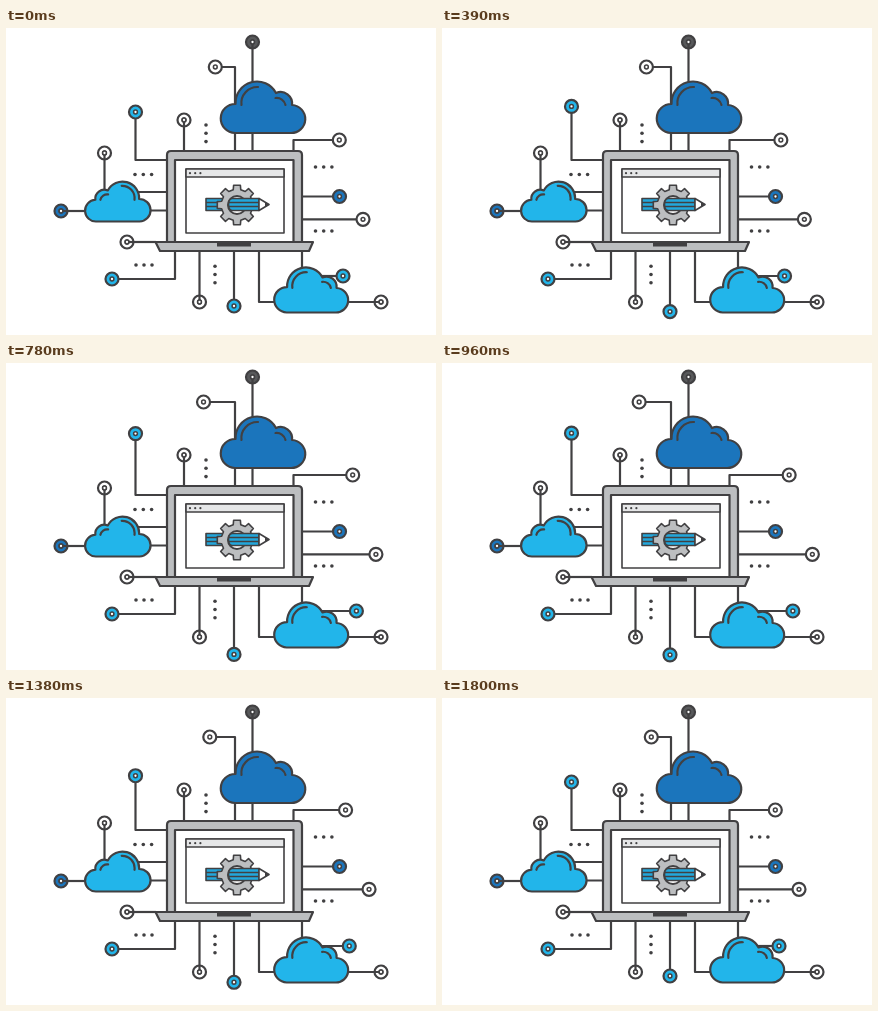
An HTML page that plays this animation: 430x307 px, repeating every 1830 ms.

```html
<!DOCTYPE html>
<html lang="en">
<head>
<meta charset="utf-8">
<title>Cloud network</title>
<style>
  html, body { margin: 0; width: 100%; height: 100%; overflow: hidden; background: #fff; }
  svg { display: block; width: 100vw; height: 100vh; }
  .line { fill: none; }
  .thin { stroke-width: 1.6; }
  use, .cloud * { vector-effect: non-scaling-stroke; }
</style>
</head>
<body>
<svg id="stage" viewBox="0 0 430 307" stroke="#414042" stroke-width="2.2" stroke-linejoin="round">
  <defs>
    <g id="cloud" class="cloud">
      <path d="M229 105A14.5 14.5 0 0 1 229.5 76A21.5 21.5 0 0 1 270 65A11.5 11.5 0 0 1 286 77A14 14 0 0 1 284.5 105Z"/>
      <path class="line" stroke-linecap="round" d="M235.5 77A16 16 0 0 1 252 59M269.5 70A9 9 0 0 1 279.5 77"/>
    </g>
  </defs>

  <g id="net"></g>
  <g id="dots" fill="#414042" stroke="none"></g>

  <use href="#cloud" fill="#1b75bc"/>
  <use href="#cloud" fill="#22b5ea" transform="translate(311 112.1) scale(-.775 .775)"/>
  <use href="#cloud" fill="#22b5ea" transform="translate(80.3 192.6) scale(.875)"/>

  <!-- laptop -->
  <path fill="#bcbec0" d="M161 214V127Q161 123 165 123H292Q296 123 296 127V214Z"/>
  <path fill="#fff" d="M169 214V132H287.5V214Z"/>
  <path fill="#bcbec0" d="M149.5 214H307L303 223H154Z"/>
  <path fill="#414042" stroke="none" d="M211 214H245V218.5H211Z"/>

  <!-- window -->
  <g class="thin">
    <path fill="#fff" d="M180 141H278V205H180Z"/>
    <path fill="#e6e7e8" d="M180 141H278V149H180Z"/>
  </g>

  <!-- pencil through gear -->
  <g class="thin">
    <path fill="#22a7dc" d="M200 170.5H220V182.5H200ZM200 174.5H220M200 178.5H220"/>
    <path id="gear" fill="#bcbec0"/>
    <circle cx="231" cy="177" r="9" fill="#fff" stroke-width="2"/>
    <path fill="#22a7dc" d="M253 170.5H226Q222.5 171 222.5 176.5T226 182.5H253ZM223 174.5H253M223 178.5H253"/>
    <path fill="#fff" d="M253 170.5L263 176.5L253 182.5Z"/>
    <path fill="#414042" stroke="none" d="M259 174L263.5 176.5L259 179Z"/>
  </g>
</svg>

<script>
const $ = id => document.getElementById(id);
const CYAN = "#22b5ea", BLUE = "#1b75bc", WHITE = "#fff";

function add(parent, tag, attrs) {
  const el = document.createElementNS("http://www.w3.org/2000/svg", tag);
  for (const key in attrs) el.setAttribute(key, attrs[key]);
  return parent.appendChild(el);
}

function addNode(x, y, fill) {
  const g = add($("net"), "g", { transform: `translate(${x} ${y})` });
  add(g, "circle", { r: 6.5, fill });
  add(g, "circle", { r: 1.9, fill: WHITE, "stroke-width": 1.5 });
  return g;
}

// wires between clouds and laptop
add($("net"), "path", { class: "line", d: "M130 164H160M140 182.5H160M253 223V274H272M296 223V245" });

// fixed nodes: x, y, fill, wire, wire reaches the centre
[
  [246.5, 14, "#58595b", "V123", 1],
  [178, 92, WHITE, "V123", 1],
  [98.5, 125, WHITE, "V168", 1],
  [55, 183, BLUE, "H85", 1],
  [121, 214, WHITE, "H150", 1],
  [106, 251, CYAN, "H169V223"],
  [193.5, 274, WHITE, "V223", 1],
  [333.5, 168.5, BLUE, "H296"],
  [375, 274, WHITE, "H335", 1]
].forEach(([x, y, fill, wire, over]) => {
  const drawWire = () => add($("net"), "path", { class: "line", d: `M${x} ${y}${wire}` });
  if (!over) drawWire();
  addNode(x, y, fill);
  if (over) {
    drawWire();
    add($("net"), "circle", { cx: x, cy: y, r: 1.9, fill: WHITE, "stroke-width": 1.5 });
  }
});

// sliding nodes: x, y, reach x, reach y, fill, wire
const sliders = [
  [209.3, 39, -12.3, 0, WHITE, "H229V123"],
  [129.5, 84, 0, -14, CYAN, "V132H160"],
  [333.3, 112, 14, 0, WHITE, "H287.5V123"],
  [357, 191.3, 13.5, 0, WHITE, "H296"],
  [337, 248, 14, 0, CYAN, "H310"],
  [228, 278, 0, 14, CYAN, "V223"]
].map(([x, y, dx, dy, fill, wire]) => ({
  x, y, dx, dy, wire,
  line: add($("net"), "path", { class: "line" }),
  node: addNode(x, y, fill)
}));

// groups of three dots: x, y, step x, step y, radius
[
  [129, 146.5, 8.3, 0, 1.8], [130, 237, 8, 0, 1.8],
  [309.5, 139, 8.2, 0, 1.8], [309.5, 203, 8.2, 0, 1.8],
  [200, 97, 0, 8.3, 1.8], [209, 238.3, 0, 8.2, 1.8]
].forEach(row => addDots($("dots"), ...row));
addDots(add($("stage"), "g", { fill: "#414042", stroke: "none" }), 184, 145.2, 5.2, 0, 1.1);

function addDots(parent, x, y, dx, dy, r) {
  for (let i = 0; i < 3; i++) add(parent, "circle", { cx: x + i * dx, cy: y + i * dy, r });
}

// eight-toothed gear
const rim = [];
for (let i = 0; i < 8; i++) {
  for (const [offset, r] of [[-.24, 15.8], [-.17, 20], [.17, 20], [.24, 15.8]]) {
    const a = i * Math.PI / 4 + offset;
    rim.push(`${231 + r * Math.sin(a)} ${177 - r * Math.cos(a)}`);
  }
}
$("gear").setAttribute("d", `M${rim.join("L")}Z`);

const LOOP = 1830, SWING = 1800, STEP = 30;
const start = performance.now();

function draw() {
  const elapsed = (performance.now() - start) % LOOP;
  const t = Math.floor(elapsed / STEP) * STEP;
  const k = (1 - Math.cos(2 * Math.PI * t / SWING)) / 2;
  for (const s of sliders) {
    const x = s.x + s.dx * k, y = s.y + s.dy * k;
    s.line.setAttribute("d", `M${x} ${y}${s.wire}`);
    s.node.setAttribute("transform", `translate(${x} ${y})`);
  }
  requestAnimationFrame(draw);
}
draw();
</script>
</body>
</html>
```
